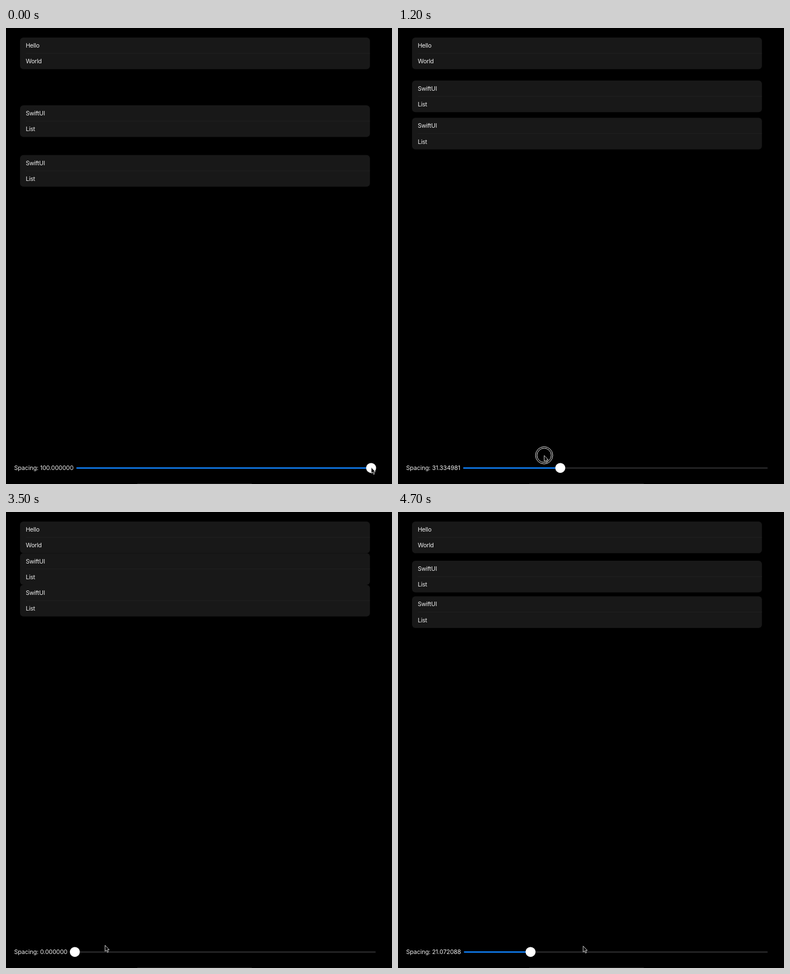
These frames come from a looping animation (688 px wide and 814 px high, 5.1 s). An HTML page:

```html
<!DOCTYPE html>
<html lang="en">
<head>
<meta charset="utf-8">
<title>List spacing</title>
<style>
  html, body { margin: 0; width: 100%; height: 100%; overflow: hidden; background: #000; }
  svg { display: block; width: 688px; height: 814px; }
  text { font: 400 10.7px Inter, "Liberation Sans", sans-serif; letter-spacing: -.28px; fill: #ededed; }
  #label { letter-spacing: -.12px; }
</style>
</head>
<body>
<svg viewBox="0 0 688 814">
  <g id="cards"></g>
  <text id="label" x="14.6" y="789.4"></text>
  <g stroke-width="2.6" stroke-linecap="round">
    <path id="track" stroke="#28282a"/>
    <path id="fill" stroke="#0b7bf2"/>
  </g>
  <circle id="thumb" cy="785.3" r="8.9" fill="#fff"/>
  <rect x="234" y="813" width="204" height="1" fill="#222"/>
  <g id="pointer">
    <g id="ring" fill="none">
      <circle r="14" stroke="#000" stroke-width="3"/>
      <g stroke="#e4e4e4"><circle r="15.4"/><circle r="12.7"/></g>
    </g>
    <path d="M0 .3V11L2.4 8.8 4.2 12.8 6 12 4.3 8.2H7.4Z" fill="#000" stroke="#fff" stroke-width=".8"/>
  </g>
</svg>
<script>
const LOOP = 5100, STEP = 50;
const TRACK_Y = 785.5, TRACK_END = 659, INSET = 8.2;
const CARD_TOP = 17, CARD_H = 56.5, GAP = 0.645;

// Drag down to zero, then back up: [time, spacing]
const SPACING = [
  [300, 100], [650, 85.442263], [1200, 31.334981], [1400, 0],
  [3700, 0], [3900, 9.701037], [4300, 21.072088]
];

// Pointer: [time, x, y]
const PATH = [
  [300, 651, 784], [650, 567, 784], [1200, 260.5, 762.8], [1400, 78, 742],
  [3100, 394, 725], [3650, 128, 784], [3900, 195.5, 782.7],
  [4350, 240, 784], [4700, 330, 774.5]
];

const $ = id => document.getElementById(id);
const label = $('label'), track = $('track'), fill = $('fill');
const thumb = $('thumb'), pointer = $('pointer'), ring = $('ring');
const within = (t, from, to) => t >= from && t < to;

// Smooth curve through the keys that never overshoots them
function sample(keys, t, n = 1) {
  const last = keys.length - 1;
  if (t <= keys[0][0]) return keys[0][n];
  if (t >= keys[last][0]) return keys[last][n];
  const secant = i => (keys[i + 1][n] - keys[i][n]) / (keys[i + 1][0] - keys[i][0]);
  const slope = i => {
    if (i === 0 || i === last) return 0;
    const a = secant(i - 1), b = secant(i);
    return a * b > 0 ? 2 * a * b / (a + b) : 0;
  };
  const i = keys.findIndex(k => k[0] > t) - 1;
  const h = keys[i + 1][0] - keys[i][0], p = (t - keys[i][0]) / h, q = 1 - p;
  const mix = p * p * (3 - 2 * p);
  return keys[i][n] * (1 - mix) + keys[i + 1][n] * mix
    + h * p * q * (slope(i) * q - slope(i + 1) * p);
}

function textWidth(s) {
  label.textContent = s;
  return label.getComputedTextLength();
}

$('cards').innerHTML = [['Hello', 'World'], ['SwiftUI', 'List'], ['SwiftUI', 'List']]
  .map(([a, b]) => `<g>
    <rect x="25" width="623.7" height="${CARD_H}" rx="6" fill="#181818"/>
    <path d="M35.5 28.2H648.7" stroke="#242424" stroke-width=".8"/>
    <text x="35.2" y="18">${a}</text><text x="35.2" y="46.3">${b}</text></g>`).join('');
const cards = [...$('cards').children];

const caption = s => 'Spacing: ' + s.toFixed(6);
const baseWidth = textWidth(caption(0));

function line(el, from, to) {
  el.setAttribute('d', `M${from + 1.3} ${TRACK_Y}H${to - 1.3}`);
}

function draw(t) {
  const s = sample(SPACING, t);
  const pitch = CARD_H + s * GAP / 2;
  const tops = [CARD_TOP, CARD_TOP + pitch + s * GAP / 2, CARD_TOP + 2 * pitch + s * GAP / 2];
  tops.forEach((y, i) => cards[i].setAttribute('transform', `translate(0 ${y})`));

  const start = 114.5 + textWidth(caption(s)) - baseWidth;
  const x = start + INSET + (TRACK_END - start - 2 * INSET) * s / 100;
  line(track, start, TRACK_END);
  line(fill, start, x);
  thumb.setAttribute('cx', x);

  pointer.setAttribute('transform', `translate(${sample(PATH, t, 1)} ${sample(PATH, t, 2)})`);
  pointer.style.display = within(t, 1400, 3100) ? 'none' : '';
  ring.style.display = within(t, 250, 1400) || within(t, 3650, 4400) ? '' : 'none';
}

const origin = performance.now();
function tick() {
  const t = (performance.now() - origin) % LOOP;
  draw(Math.floor(t / STEP) * STEP);
  requestAnimationFrame(tick);
}
tick();
</script>
</body>
</html>
```
